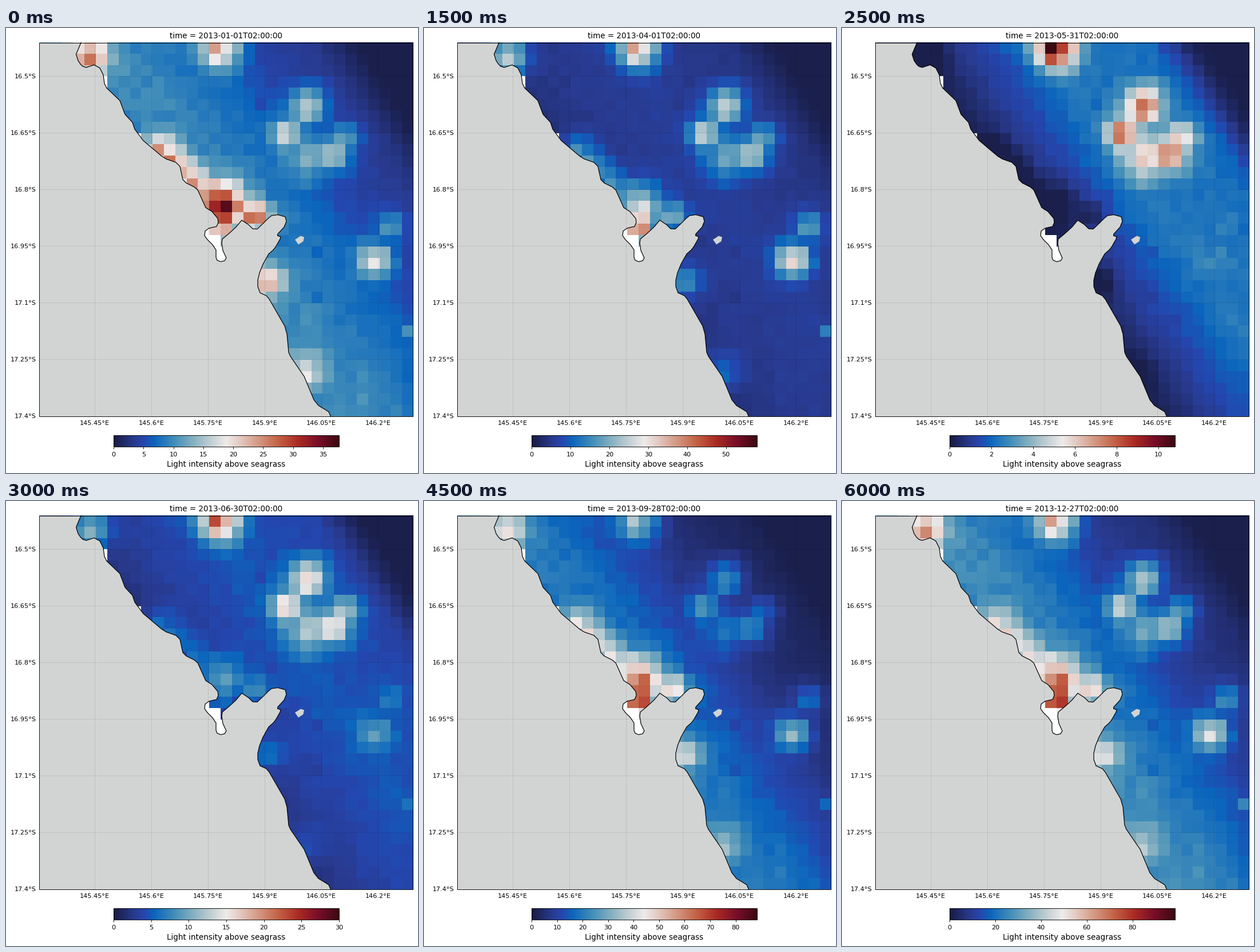
A matplotlib script that plays this animation: 720x778 px, repeating every 6.5 s.

```python
import numpy as np
import matplotlib.pyplot as plt
from matplotlib.animation import FuncAnimation
from matplotlib.collections import LineCollection
from matplotlib.colors import LinearSegmentedColormap
from matplotlib.patches import Polygon, Rectangle

W, H, DPI = 720, 778, 64
PT = 72 / DPI                       # points per pixel
FRAMES, INTERVAL = 13, 500
N = 33                              # grid cells per side
LEFT, RIGHT, TOP, BOTTOM = 58.0, 711.4, 25.6, 679.4
BAR_X0, BAR_X1, BAR_Y0, BAR_Y1 = 188, 582, 712.4, 732
LAND = "#d2d4d3"

plt.rcParams["font.family"] = "DejaVu Sans"

# Diverging scale from navy through white to dark red, positions in 22nds
BALANCE = {
    0: "#181c43", 2: "#293a8f", 3: "#2447af", 4: "#0b66bd", 6: "#4590b9",
    8: "#8eb5c2", 10: "#d2d8db", 11: "#eeebeb", 12: "#e6d2cc",
    14: "#d59d89", 16: "#c46548", 18: "#ac2b24", 20: "#780e28", 22: "#3c0911",
}
CMAP = LinearSegmentedColormap.from_list(
    "balance", [(p / 22, color) for p, color in BALANCE.items()], N=256)
CMAP.set_bad("white")

# Strength of each part of the sea at the key steps of 30 days
KEYS = [0, 1, 3, 5, 7, 9, 12]
LEVELS = dict(
    peak=[37.7, 41.9, 58, 10.8, 49.2, 88.4, 98.6],
    offshore=[.09, .02, .08, .21, .06, .03, .06],
    shelf=[.25, .28, .07, .03, .12, .22, .26],
    river=[.50, .32, .38, -.1, .70, .33, .45],
    shore=[.56, .40, .28, -.1, .42, .39, .36],
    inlet=[.10, .05, .50, 0, .05, .40, .40],
    reef=[.30, .40, .35, .52, .28, .20, .32],
    cay=[.32, .40, .42, .03, .26, .28, .34],
)

COAST_NORTH = [
    (131, 25.6), (122.5, 46), (126, 57), (130, 63), (134, 67), (140, 69),
    (154, 64.5), (164, 70), (170, 82), (172, 97), (176, 105), (199, 127),
    (208, 151), (221, 165), (225, 177), (240, 197), (272, 224), (280, 229),
    (297, 235), (304, 242), (309, 265), (315, 271), (329, 278), (335, 283),
    (349, 314), (360, 321), (370, 333),
]
INLET = [
    (371, 340), (368, 347), (355, 350), (348, 355), (347, 363), (352, 370),
    (361, 379), (367, 388), (367, 401), (369, 406), (375, 408.5),
    (382, 407), (385, 402), (379, 389), (377, 376), (378, 369), (390, 359),
    (402, 348), (412, 336), (424, 344), (431, 351), (439, 351.5),
]
COAST_SOUTH = [
    (449, 342), (458, 333), (464, 328), (475, 326.5), (488, 330), (490, 338),
    (486, 348), (475, 360), (474.5, 363), (480, 365), (479, 369), (471, 383),
    (467, 388), (459, 395), (449, 413), (443, 428), (440, 441), (440, 452),
    (444, 463), (455, 468), (460, 474), (487, 521), (491, 535), (494, 567),
    (497, 574), (521, 609), (538, 650), (546, 660), (564, 671), (567.5, 679.4),
]
COAST = COAST_NORTH + INLET + COAST_SOUTH
ISLAND = [(505, 370), (515, 363.5), (521, 365.5), (519.5, 373), (511, 378.5)]

row, col = np.mgrid[0:N, 0:N]


def bump(c, r, size, weight=1):
    return weight * np.exp(-((col - c) ** 2 + (row - r) ** 2) / (2 * size**2))


def group(*bumps):
    return np.max(bumps, axis=0)


# Cells out to sea from the straight line between the ends of the coast
out = .832 * (col - 3.7) - .556 * row
beach = [bump(10.2 + 4 * t, 9 + 4 * t, .9, .75) for t in np.linspace(0, 1, 5)]
PARTS = dict(
    offshore=np.clip(out / 9, 0, 1) / (1 + np.exp((out - 18.5) / .8)),
    shelf=np.exp(-(out.clip(0) / 9) ** 2),
    river=bump(4, .8, 1.1),
    shore=group(*beach, bump(15.5, 13.9, 1.5, 1.15), bump(18.5, 14.7, .9),
                bump(19.4, 20.6, 1, .75), bump(22.8, 28.6, 1.2, .4)),
    inlet=bump(15.5, 16, .9),
    reef=group(bump(15.4, -.1, 1.25, 1.4), bump(21.4, 7.6, 1),
               bump(23.2, 5.1, 1.15), bump(25.4, 9.4, 1.1),
               bump(23.3, 9.5, 1.5, .65), bump(26.3, 8, 1, .65)),
    cay=group(bump(29.1, 18.7, 1.1), bump(30.5, 15.8, 1, .5),
              bump(32, 25, .4, .3)),
)
grain = 1 + .05 * np.random.default_rng(4).standard_normal((N, N))
# Cells without data along the coast and in the inlet
missing = ((row == 3) & (col < 6) | (row == 8) & (col < 9)
           | (row == 16) & (col < 15) | (row >= 17) & (col < 16)
           | (row >= 18) & (col < 17))


def level(name, step):
    return np.interp(step, KEYS, LEVELS[name])


def light(step):
    field = sum(level(name, step) * part for name, part in PARTS.items())
    return np.ma.array((field * grain).clip(.015, 1), mask=missing)


fig = plt.figure(figsize=(W / DPI, H / DPI), dpi=DPI, facecolor="white")
ax = fig.add_axes([0, 0, 1, 1])
ax.axis("off")


def image(data, extent):
    return ax.imshow(data, cmap=CMAP, vmin=0, vmax=1, extent=extent,
                     interpolation="nearest", aspect="auto", zorder=1)


def label(x, y, text, size, ha="center"):
    return ax.text(x, y, text, size=size * PT, ha=ha, va="baseline")


def box(x0, y0, x1, y1):
    ax.add_patch(Rectangle((x0, y0), x1 - x0, y1 - y0, fill=False,
                           ec="black", lw=.9 * PT, zorder=5))


sea = image(light(0), (LEFT, RIGHT, BOTTOM, TOP))
image(np.linspace(0, 1, 256)[None, :], (BAR_X0, BAR_X1, BAR_Y1, BAR_Y0))
ax.set(xlim=(0, W), ylim=(H, 0))

ax.add_patch(Polygon(COAST + [(LEFT, BOTTOM), (LEFT, TOP)], fc=LAND, lw=0,
                     zorder=2))
ax.add_patch(Polygon(ISLAND, fc=LAND, lw=0, zorder=2))
ax.plot(*zip(*COAST), color="black", lw=1.2 * PT, zorder=4)
box(LEFT, TOP, RIGHT, BOTTOM)
box(BAR_X0, BAR_Y0, BAR_X1, BAR_Y1)

grid = dict(color="black", alpha=.1, lw=.9 * PT, zorder=3)
for k in range(6):
    x = 154.7 + 99.1 * k
    ax.plot([x, x], [TOP, BOTTOM], **grid)
    label(x, 694.3, f"{145.45 + .15 * k:.5g}°E", 11.25)
for k in range(7):
    y = 83.9 + 99.1 * k
    if k < 6:
        ax.plot([LEFT, RIGHT], [y, y], **grid)
    label(53, y + 3.9, f"{16.5 + .15 * k:.4g}°S", 11.25, "right")

title = label((LEFT + RIGHT) / 2, 18.4, "", 13.5)
label((BAR_X0 + BAR_X1) / 2, 767.3, "Light intensity above seagrass", 13.5)
ticks = LineCollection([], colors="black", linewidths=.9 * PT)
ax.add_collection(ticks, autolim=False)
tick_labels = [label(0, 749, "", 11.25) for _ in range(10)]


def draw(i):
    sea.set_data(light(i))
    day = np.datetime64("2013-01-01T02:00:00") + np.timedelta64(30 * i, "D")
    title.set_text(f"time = {day}")

    peak = level("peak", i)
    step = next(s for s in (1, 2, 5, 10, 20) if peak / s <= 9)
    values = np.arange(0, peak, step)
    xs = BAR_X0 + (BAR_X1 - BAR_X0) * values / peak
    ticks.set_segments([[(x, BAR_Y1), (x, BAR_Y1 + 4)] for x in xs])
    for text in tick_labels:
        text.set_text("")
    for text, x, value in zip(tick_labels, xs, values):
        text.set_x(x)
        text.set_text(f"{value:.0f}")
    return sea, title, ticks, *tick_labels


anim = FuncAnimation(fig, draw, frames=FRAMES, interval=INTERVAL,
                     repeat=True, repeat_delay=0)
plt.show()
```
